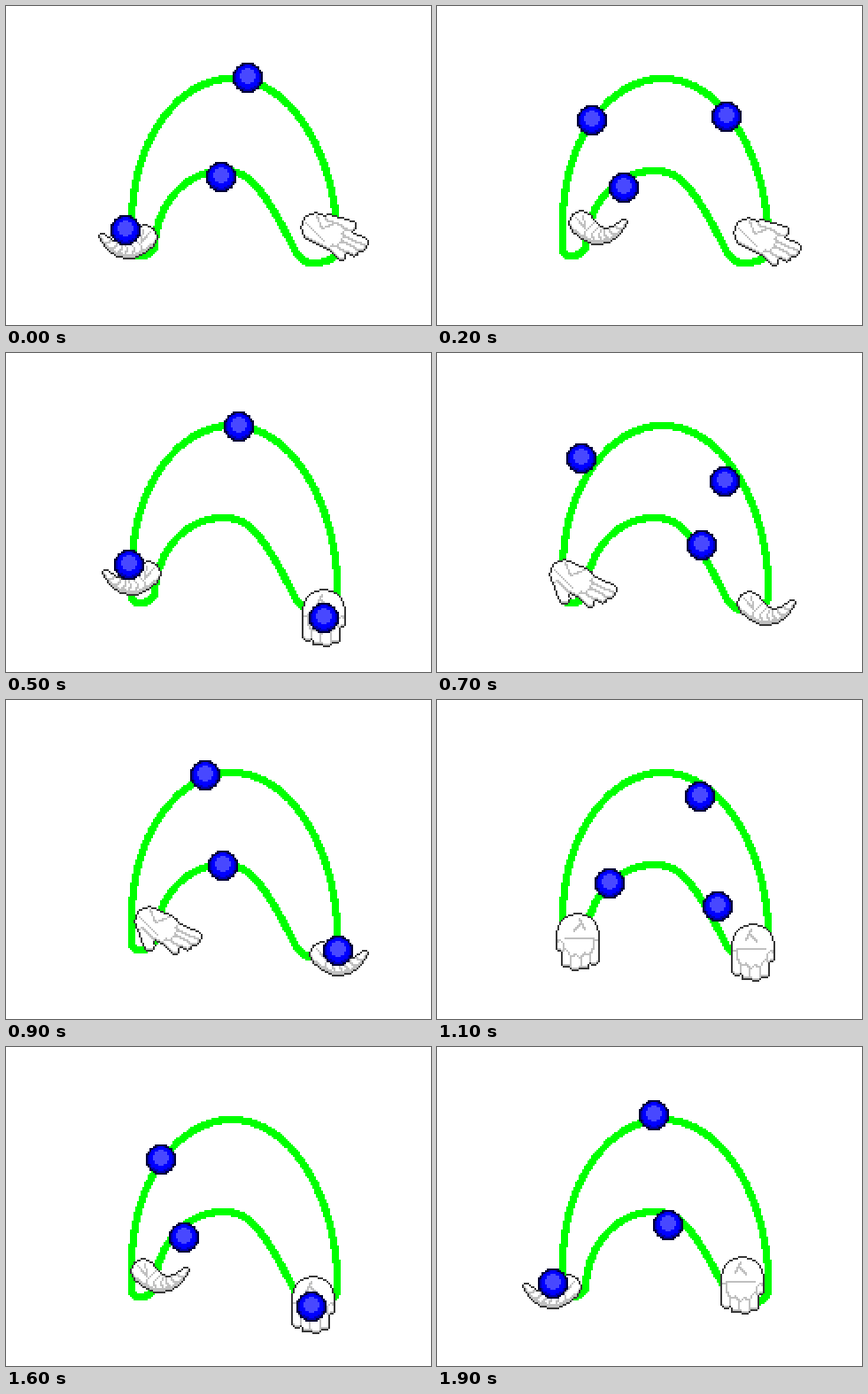
These frames come from a looping animation (480x360 px, 2 s). An HTML page with a canvas:

```html
<!DOCTYPE html>
<html lang="en">
<head>
<meta charset="utf-8">
<title>Three-ball juggling</title>
<style>
html, body { margin: 0; width: 100%; height: 100%; overflow: hidden; background: #fff; }
canvas { display: block; width: 480px; height: 360px; image-rendering: pixelated; }
svg { position: absolute; }
</style>
</head>
<body>
<svg width="0" height="0"><path id="track" fill="none" d="M142 274 V245 A113 163 0 0 1 255 82
  A119.5 190 0 0 1 374.5 272 Q374 290 346 290 Q335 290 327 277 C292 208 275 185 245 186
  A77 88 0 0 0 168 272 Q162 282 152 282 Q142 282 142 274 Z"/></svg>
<canvas id="stage" width="240" height="180"></canvas>
<script>
const STEP = 100, STEPS = 20;
const ctx = document.getElementById('stage').getContext('2d');

// Small bitmap painted by a function that receives a dot-drawing helper
function bitmap(w, h, paint) {
  const c = document.createElement('canvas');
  c.width = w;
  c.height = h;
  const g = c.getContext('2d');
  paint((x, y, color, dw = 1, dh = 1) => {
    g.fillStyle = color;
    g.fillRect(Math.round(x), Math.round(y), dw, dh);
  }, g);
  return c;
}

const track = bitmap(240, 180, dot => {
  const path = document.getElementById('track');
  for (let s = 0, end = path.getTotalLength(); s < end; s++) {
    const p = path.getPointAtLength(s);
    dot(p.x / 2 - 2, p.y / 2 - 1, '#00ff00', 4, 2);
    dot(p.x / 2 - 1, p.y / 2 - 2, '#00ff00', 2, 4);
  }
});

const ball = bitmap(17, 17, dot => {
  const disc = (cy, r, color) => {
    for (let y = 0; y < 17; y++) {
      for (let x = 0; x < 17; x++) {
        if (Math.hypot(x - 8, y - cy) <= r) dot(x, y, color);
      }
    }
  };
  disc(8, 8.6, '#000038');
  disc(8, 7.5, '#0000b0');
  disc(7.5, 6.8, '#0000ff');
  disc(7, 4.3, '#4848ff');
});

// Hands are unions of tapered capsules: x0, y0, x1, y1, r0, r1
function depth([x0, y0, x1, y1, r0, r1 = r0], x, y) {
  const dx = x1 - x0, dy = y1 - y0;
  const u = Math.min(1, Math.max(0, ((x - x0) * dx + (y - y0) * dy) / (dx * dx + dy * dy)));
  return r0 + (r1 - r0) * u - Math.hypot(x - x0 - dx * u, y - y0 - dy * u);
}

const fingers = make => [0, 1, 2, 3].map(make);

function frontParts() {
  return [
    [12, 12, 12, 14, 12.3],
    [21, 14, 21.3, 19, 3],
    ...fingers(i => {
      const x = 3 + 5.2 * i;
      return [x, 16, x, 26 + 3.4 * Math.sin(i * .92), 3.2];
    })
  ];
}

function spreadParts(thumb) {
  return [
    [8.5, 8.5, 18, 13, 8.6],
    thumb,
    ...fingers(i => [17, 9 + 3 * i, 35.5 - 1.4 * i * i, 17 + 2.5 * i, 3.1])
  ];
}

// Curled hand: thick at the wrist, tapering along a curve to the fingertips
function cupParts() {
  const n = 7;
  const at = u => {
    const v = 1 - u;
    return {
      x: 7 * v * v + 38 * u * v + 31 * u * u,
      y: 7 * v * v + 43 * u * v + 6.7 * u * u,
      r: 7.2 - 5 * u ** 1.3
    };
  };
  return Array.from({ length: n }, (_, i) => {
    const a = at(i / n), b = at((i + 1) / n);
    return [a.x, a.y, b.x, b.y, a.r, b.r];
  });
}

function hand(parts, lines, shade, flip) {
  const best = (x, y) => {
    const d = parts.map((p, i) => depth(p, x, y) - i / 1000);
    const top = Math.max(...d);
    return top < 0 ? -1 : d.indexOf(top);
  };
  const inside = (x, y) => best(x, y) >= 0;
  const w = flip || 40;
  return bitmap(w, 34, (dot, g) => {
    if (flip) {
      g.translate(w, 0);
      g.scale(-1, 1);
    }
    const eachInside = paint => {
      for (let y = 0; y < 34; y++) {
        for (let x = 0; x < 40; x++) if (inside(x, y)) paint(x, y);
      }
    };
    eachInside((x, y) => {
      const part = best(x, y);
      const crease = part !== best(x + 1, y) || part !== best(x, y + 1);
      dot(x, y, crease || !inside(x, y + shade) ? '#c0c0c0' : '#fff');
    });
    for (const [x0, y0, x1, y1] of lines) {
      for (let u = 0; u <= 1; u += .05) dot(x0 + (x1 - x0) * u, y0 + (y1 - y0) * u, '#c0c0c0');
    }
    eachInside((x, y) => {
      const rim = x === 0 || y === 0 || !inside(x - 1, y) || !inside(x + 1, y) ||
        !inside(x, y - 1) || !inside(x, y + 1);
      if (rim) dot(x, y, '#383838');
    });
  });
}

const palmLines = [[11, 3, 8, 9], [11, 6, 14, 10], [3, 14, 20, 14]];
const spreadLines = [[9, 2, 12, 9], [3, 6, 13, 16], [12, 9, 20, 6]];
const cupLines = [[4, 4, 10, 11], [8, 3, 9, 8]];
const hands = {
  front: hand(frontParts(), palmLines, 2),
  frontL: hand(frontParts(), palmLines, 2, 25),
  open: hand(spreadParts([16, 4, 28.5, 7.5, 3.2]), spreadLines, 2),
  reach: hand(spreadParts([5, 12, 8.5, 22, 3.6]), spreadLines, 2),
  cup: hand(cupParts(), cupLines, 3),
  cupL: hand(cupParts(), cupLines, 3, 34)
};

// Hand keys: step, pose, left, top
const handKeys = [
  [[0, 'cupL', 105, 246], [2, 'cup', 149, 231], [5, 'cupL', 109, 234], [9, 'reach', 145, 232],
    [13, 'frontL', 125, 249], [16, 'cup', 141, 239], [19, 'cupL', 97, 256]],
  [[0, 'open', 333, 232], [2, 'open', 335, 238], [5, 'front', 335, 267], [9, 'cup', 343, 272],
    [13, 'front', 323, 235], [16, 'front', 323, 259], [19, 'front', 321, 237]]
];

// Flights of each ball, from throw to catch: step, centre x, centre y
const balls = [
  [
    [[0, 135, 252], [2, 175, 128], [5, 263, 82], [9, 375, 282]],
    [[9, 375, 282], [13, 267, 208], [16, 201, 214], [19, 131, 266]],
    [[19, 131, 266], [20, 135, 252]]
  ],
  [
    [[5, 139, 238], [9, 225, 84], [13, 353, 172], [16, 345, 292]],
    [[16, 345, 292], [19, 261, 200], [22, 211, 204], [25, 139, 238]]
  ],
  [
    [[5, 359, 298], [9, 245, 186], [13, 149, 280]],
    [[13, 149, 280], [16, 175, 126], [19, 245, 76], [22, 327, 124], [25, 359, 298]]
  ]
];

// Polynomial through the points of a flight; three points give a parabola
function along(flight, t, axis) {
  return flight.reduce((sum, p) => sum + flight.reduce(
    (term, q) => q === p ? term : term * (t - q[0]) / (p[0] - q[0]), p[axis]), 0);
}

function drawBall(flights, step) {
  const t = step < flights[0][0][0] ? step + STEPS : step;
  const flight = flights.find(f => t <= f.at(-1)[0]);
  ctx.drawImage(ball, Math.floor(along(flight, t, 1) / 2) - 8, Math.floor(along(flight, t, 2) / 2) - 8);
}

function drawHand(keys, t) {
  const i = keys.findLastIndex(k => k[0] <= t);
  const a = keys[i], b = keys[(i + 1) % keys.length];
  const u = (t - a[0]) / ((b[0] - a[0] + STEPS) % STEPS);
  const at = k => Math.floor((a[k] + (b[k] - a[k]) * u) / 2);
  ctx.drawImage(hands[(u < .5 ? a : b)[1]], at(2), at(3));
}

function draw(now) {
  const t = Math.floor(now / STEP) % STEPS;
  ctx.fillStyle = '#fff';
  ctx.fillRect(0, 0, 240, 180);
  ctx.drawImage(track, 0, 0);
  handKeys.forEach(keys => drawHand(keys, t));
  balls.forEach(flights => drawBall(flights, t));
}

const start = performance.now();
function loop() {
  draw(performance.now() - start);
  requestAnimationFrame(loop);
}
loop();
</script>
</body>
</html>
```
